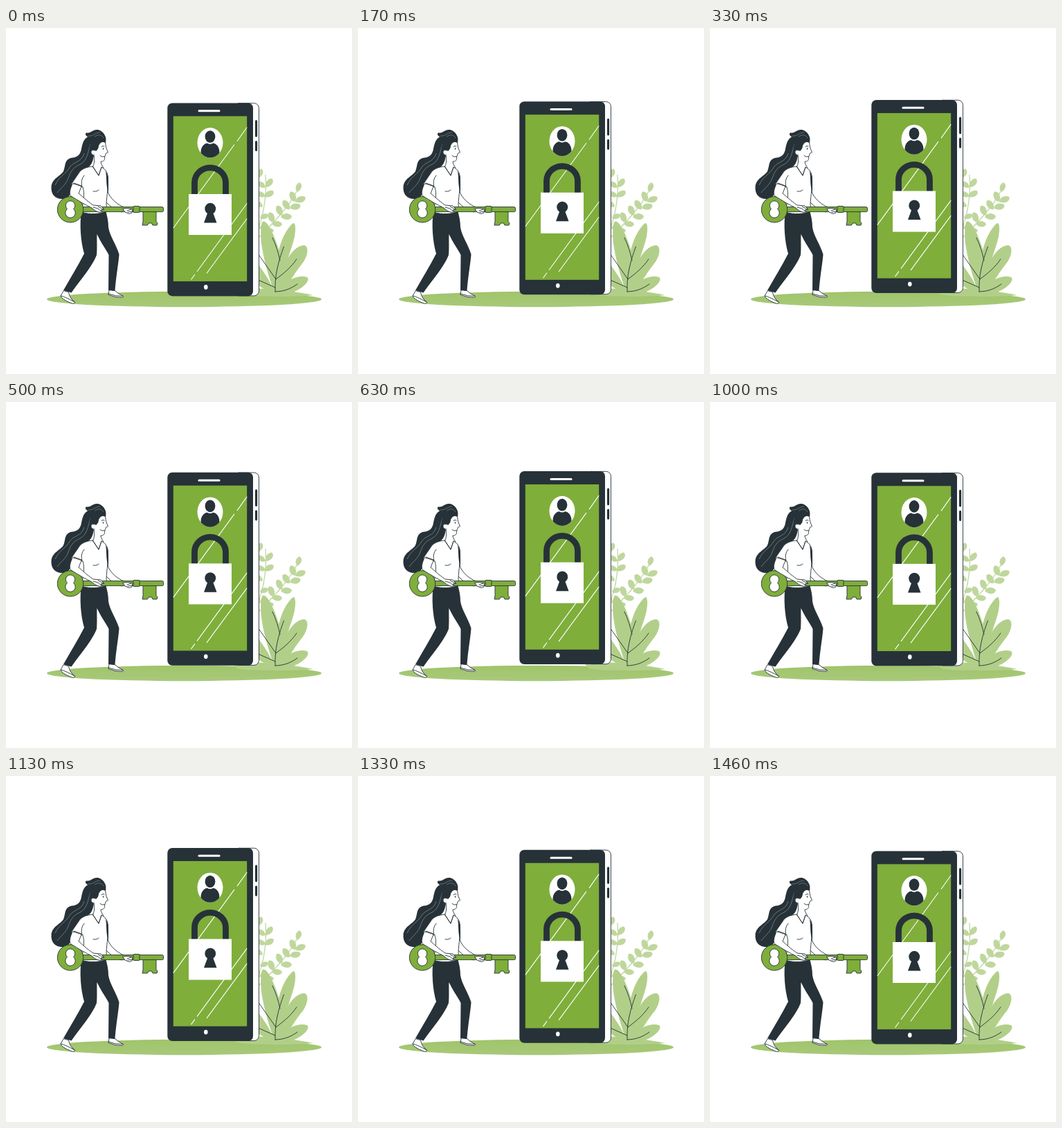
These frames come from a looping animation (500x500 px, 1.5 s). An HTML page:

```html
<!DOCTYPE html>
<html lang="en">
<head>
<meta charset="utf-8">
<title>Unlocking a phone</title>
<style>
  html, body { margin: 0; height: 100%; overflow: hidden; background: #fff; }
  svg { display: block; width: 100%; height: 100%; }
  .dark { fill: #263238; }
  .green { fill: #7fae3b; }
  .white { fill: #fff; }
  .line { fill: none; stroke: #263238; stroke-width: .9; stroke-linecap: round; stroke-linejoin: round; }
  .skin { fill: #fff; stroke: #263238; stroke-width: .9; stroke-linejoin: round; stroke-linecap: round; }
  .glare { fill: none; stroke: #fff; stroke-width: 1.1; }
</style>
</head>
<body>
<svg viewBox="0 0 500 500">
  <defs>
    <linearGradient id="ground" x2="0" y2="1">
      <stop stop-color="#a0c46a"/><stop offset="1" stop-color="#a8c97a"/>
    </linearGradient>
    <clipPath id="badge"><ellipse cx="295" cy="165.7" rx="18.5" ry="21.6"/></clipPath>
  </defs>

  <ellipse cx="257.5" cy="392" rx="198.5" ry="11.2" fill="url(#ground)"/>

  <g id="sprigs" fill="#bfd79d">
    <path d="M357 315C370 275 378 250 375 212M362 306C382 286 408 260 420 236" fill="none" stroke="#bfd79d" stroke-width="1.3"/>
  </g>

  <g fill="#b2cf89">
    <path d="M328 379C345 372 360 378 388 377C415 381 435 384 444 386C420 389 350 389 334 385Z"/>
    <path d="M388 383C376 350 362 300 371 280C377 276 391 302 399 340L394 383Z"/>
    <path d="M388 383C386 345 395 298 415 282C420 281 419 300 413 316C405 338 402 358 392 383Z"/>
    <path d="M389 383C396 352 410 315 431 314C439 316 436 332 426 343C414 358 408 374 392 383Z"/>
    <path d="M389 383C397 369 420 355 435 360C441 365 428 377 414 382Z"/>
    <path d="M389 383C377 355 354 325 342 322C335 345 360 378 389 383Z"/>
  </g>
  <path class="line" d="M389 381C388 357 394 336 401.500 316M385 303C390 313 394 326 396 336M390 363C401 355 412 346 420 334M389 381C402 381 413 376 421 370M364 326L390 363M362 363L389 375"/>

  <g id="phone">
    <rect class="skin" x="330" y="108.700" width="35.500" height="278.300" rx="7"/>
    <rect class="dark" x="233.300" y="108.400" width="123.700" height="279" rx="7"/>
    <path d="M361.600 134.500V156M361.600 164.500V176.500" stroke="#263238" stroke-width="3.200" stroke-linecap="round"/>
    <rect class="green" x="241.800" y="127.400" width="106.400" height="238.700"/>
    <path d="M279 119.800H308" stroke="#fff" stroke-width="3" stroke-linecap="round"/>
    <ellipse class="white" cx="288.800" cy="374.500" rx="2.800" ry="3.400"/>
    <path class="glare" d="M348.200 143.500L334 163.500M330 168.500L241.800 289M348.200 253.500L276 352M273 356L267.500 363.500M348.200 275.500L290 354.500"/>
    <g clip-path="url(#badge)">
      <rect class="white" x="276" y="143" width="38" height="46"/>
      <ellipse class="dark" cx="295" cy="157" rx="7.400" ry="8.800"/>
      <path class="dark" d="M281.500 190V180C281.500 171 287 166.500 291 166.500Q295 169 299 166.500C304 166.500 308.500 172 308.500 180V190Z"/>
    </g>
    <path d="M272.500 242V223.500a22.500 21.700 0 0 1 45 0V242" fill="none" stroke="#263238" stroke-width="8.800"/>
    <rect class="white" x="264" y="240" width="62" height="59"/>
    <path class="dark" d="M291 268L286 281.500H304.500L299.500 268A8 8.200 0 1 0 291 268Z"/>
  </g>

  <g id="woman">
    <path class="dark" d="M143.500 167C147 158 141 149 133 147C125 146 124 152 115.500 151.500C113.500 155 117 156 118 157.500C111 161 110 170 108.500 177C106 186 100 187 93 188C84 191 86 200 83 207C79 214 67 217 65.500 229C64.500 241 72 248 83 247C93 246 94 237 97 228C101 219 110 212 114 204C123 201 127 191 126.500 183L130 172Z"/>
    <path d="M122 168C118 181 117 192 107 197C97 201 93 208 90 217C87 226 79 231 74 238M113 181C110 193 99 193 93 200C87 211 76 215 71 227" fill="none" stroke="#8b9396" stroke-width=".7"/>

    <path class="skin" d="M127 184C128 190 128 196 125 202L134 213L141 202C138 198 137 195 137 193C141 193 143 191 142.500 187C143 185 144 184 144 181.500L147.500 179.500C145 175 144 171 143.500 165C136 162 130 166 126 175Z"/>
    <path class="dark" d="M121 182C119 169 124 160 134 157C140 155 144 160 143.500 166C139 163 136 166 134 170C133 175 131 177 128 176C126 179 126 183 126.500 187Z"/>
    <path class="skin" d="M128 177C123 174 120 182 127 184" />
    <path class="dark" d="M133 169C135 173 132 176 130 178L125 174Z"/>
    <ellipse class="dark" cx="140.500" cy="174.500" rx=".7" ry="1.200"/>
    <path class="line" d="M138 171.500Q140 169.500 142 171M136 184.500Q139 187.500 142.500 185.500"/>
    <path d="M118 156C126 157 129 151 136 151M128 157C134 153 139 155 141 159" fill="none" stroke="#8b9396" stroke-width=".6"/>

    <path class="dark" d="M109 264C106 284 108 309 113 326C104 344 93 361 83 379L94.500 382.500C107 365 125 344 131 328C132 317 131 306 131.500 298C137 310 144 319 148.500 328L148 379L157.500 380C159 360 163 337 163.500 327C159 312 150 301 148 288C148 279 146 271 144 264Z"/>
    <path class="skin" d="M83 380L79 387Q80 392 94 397.500Q100 399.500 99.500 396Q92 391 90.500 382Z"/>
    <path class="line" d="M79.500 387Q87 389 99 396"/>
    <path class="skin" d="M149 379L148 385.500Q158 390 168.500 389.500Q171.500 387.500 163 384L158 380Z"/>
    <path class="line" d="M148 384Q158 388 169 387.500"/>

    <path class="skin" d="M142 208C147 222 145 234 149 241C154 249 160 254 170 259L168 266C154 263 145 253 138 243Z"/>
    <path class="skin" d="M125 200C117 201 109 203 105 210L94 226L111 230C114 239 112 250 109 266C121 270 136 269 146 265C143 252 148 239 147 221C149 211 144 204 138 201L134 213Z"/>
    <path class="dark" d="M144 207C149 213 148 224 148 237C144 227 146 218 144 207Z"/>
    <path class="line" d="M125 200L134 213L138 201M126 236Q131 237 134 234M113 213Q107 220 110 230"/>
  </g>

  <g id="key" class="green" stroke="#263238" stroke-width=".9" stroke-linejoin="round">
    <path d="M198 264V280L197 285H204.500L206 282H210.500L212 285H218L219 282L217 279.500V264Z"/>
    <rect x="108" y="258.600" width="119.500" height="7" rx="1.800"/>
    <rect x="184" y="257.500" width="9" height="9" rx="1"/>
    <circle cx="93" cy="262.300" r="18.700"/>
    <path class="white" d="M88.500 261.500A6.700 6.700 0 1 1 97.500 261.500A7.200 7.200 0 1 1 88.500 261.500Z"/>
  </g>

  <path class="skin" d="M96 225C92 234 91 240 94 243C104 249 115 256 124 260C129 265 134 267 139 266L137 263L142 262L137 257L126 256C117 250 110 243 105 239L109 229Z"/>
  <path class="skin" d="M98 224L109 228" />
  <path class="line" d="M126 259L133 261L139 266M133 258L141 262"/>
  <path class="skin" d="M169 261L177 260.500L183 262L182 267L178 268.500L172 266Z"/>
  <path class="line" d="M175 264L181 262M176 266L182 265"/>
</svg>
<script>
  const LOOP = 1500, STEPS = 36, LIFT = 10;
  const phone = document.getElementById("phone");
  const sprigs = document.getElementById("sprigs");

  // Each leaf: base x, base y, direction in degrees, length.
  const leaves = [
    [366, 216, -75, 13], [376, 230, -52, 15], [375, 230, -145, 13],
    [374, 244, -30, 15], [375, 243, -155, 13], [371, 258, -145, 13],
    [367, 275, -22, 13], [366, 290, -20, 13],
    [421, 237, -73, 14], [418, 251, -112, 16], [418, 251, -20, 16],
    [410, 262, -125, 16], [410, 260, -10, 16], [399, 271, -115, 16],
    [397, 273, 0, 16], [387, 281, -112, 16], [384, 283, 5, 15],
    [376, 291, -115, 12], [374, 293, 0, 13]
  ];
  for (const [x, y, angle, size] of leaves) {
    const leaf = document.createElementNS("http://www.w3.org/2000/svg", "path");
    leaf.setAttribute("d", "M0 0C.2 -.38 .72 -.42 1 -.08C.95 .3 .4 .4 0 0Z");
    leaf.setAttribute("transform", `translate(${x} ${y}) rotate(${angle}) scale(${size})`);
    sprigs.append(leaf);
  }

  // The phone rises and falls linearly, held at 24 steps per second.
  function draw() {
    const t = performance.now() % LOOP;
    const step = Math.floor((t + 5) * STEPS / LOOP) % STEPS;
    const phase = (step + .5) / STEPS;
    const rise = LIFT * (1 - Math.abs(1 - 2 * phase));
    phone.setAttribute("transform", `translate(0 ${(.28 - rise).toFixed(3)})`);
    requestAnimationFrame(draw);
  }
  draw();
</script>
</body>
</html>
```
